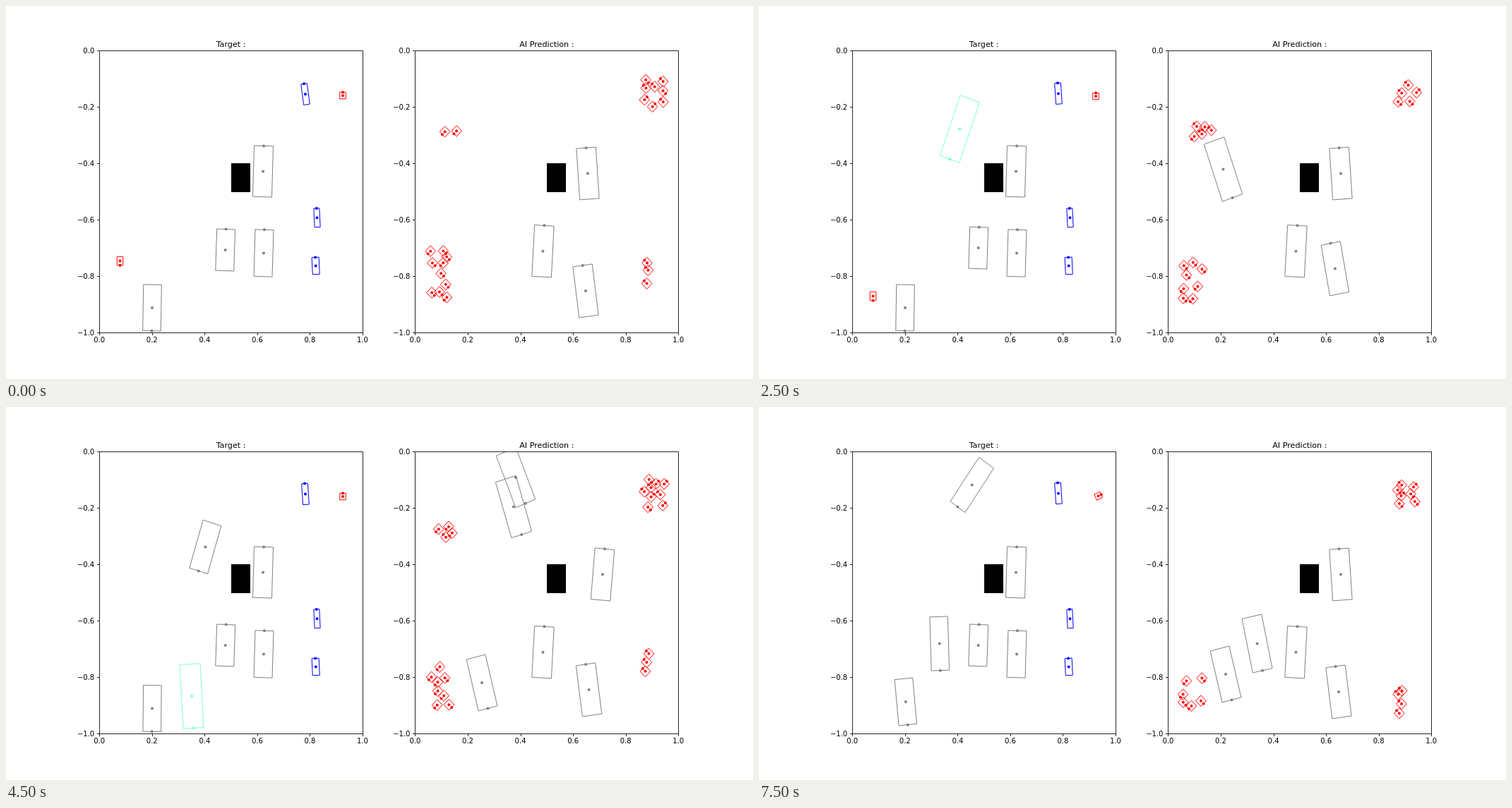
Write an HTML page that moves like this. It is 1058 by 529 pixels and loops after 8000 ms.

```html
<!DOCTYPE html>
<html lang="en">
<head>
<meta charset="utf-8">
<title>Target and prediction</title>
<style>
  html, body { margin: 0; width: 100%; height: 100%; overflow: hidden; background: #fff; }
  svg { display: block; width: 100%; height: 100%; }
  text { font: 10px "DejaVu Sans", sans-serif; }
  .title { font-size: 11.2px; text-anchor: middle; }
  .axes { fill: none; stroke: #000; stroke-opacity: .85; }
</style>
</head>
<body>
<svg viewBox="0 0 1058 529">
  <defs>
    <clipPath id="plots"><path d="M132 63h374v401h-374zM579 63h374v401h-374z"/></clipPath>
  </defs>
  <g id="boxes" clip-path="url(#plots)"></g>
  <g id="frame"></g>
</svg>
<script>
const STEP = 500, STEPS = 16;
const TOP = 63.48, WIDTH = 372.7, HEIGHT = 399.4, ASPECT = HEIGHT / WIDTH;
const LEFT = 132.25, SHIFT = WIDTH * 1.2;
const GREY = '#808080', BLUE = '#00f', RED = '#f00', AQUA = '#7fffd4';

// ---- Axes ----
function plot(left, title) {
  const snap = v => Math.round(v) + .5;
  const x = k => snap(left + WIDTH * k / 5), y = k => snap(TOP + HEIGHT * k / 5);
  let ticks = '', labels = '';
  for (let k = 0; k <= 5; k++) {
    const value = (k / 5).toFixed(1);
    ticks += `M${x(k)} ${y(5)}v3.5M${x(0)} ${y(k)}h-3.5`;
    labels += `<text x="${left + WIDTH * k / 5}" y="477" text-anchor="middle">${value}</text>
      <text x="${left - 7}" y="${TOP + HEIGHT * k / 5 + 3.8}" text-anchor="end">${k ? '−' : ''}${value}</text>`;
  }
  return `<rect x="${Math.round(left + WIDTH / 2)}" y="223" width="27" height="41"/>
    <path class="axes" d="M${x(0)} ${y(0)}H${x(5)}V${y(5)}H${x(0)}Z${ticks}"/>${labels}
    <text class="title" x="${left + WIDTH / 2}" y="57.8">${title}</text>`;
}
document.getElementById('frame').innerHTML = plot(LEFT, 'Target :') + plot(LEFT + SHIFT, 'AI Prediction :');

// Heading in degrees clockwise from up. A box is rectangular in data units,
// so everything vertical is stretched by ASPECT.
function box(color, x, y, heading, halfLength, width) {
  const angle = heading * Math.PI / 180, sin = Math.sin(angle), cos = Math.cos(angle);
  const point = (along, across) => [
    x + sin * along + cos * across,
    y + (sin * across - cos * along) * ASPECT
  ].map(v => v.toFixed(2));
  const dot = ([cx, cy]) => `<circle cx="${cx}" cy="${cy}" r="2" fill="${color}"/>`;
  const half = width / 2;
  const corners = [point(halfLength, -half), point(halfLength, half), point(-halfLength, half), point(-halfLength, -half)];
  return `<polygon points="${corners.join(' ')}" fill="none" stroke="${color}"/>`
    + dot(point(0, 0)) + dot(point(halfLength, 0));
}

const bump = (s, center, spread) => Math.exp(-(((s - center) / spread) ** 2));
const within = (s, ...ranges) => ranges.some(([from, to]) => s >= from && s <= to);

// ---- Moving cars: a smooth path through [step, x, y], heading along it ----
const movers = [
  { color: AQUA, steps: [2, 9], halfLength: 42.4, width: 29, path: [[4, 301.5, 134.3], [6, 272, 222], [9, 263, 410]] },
  { color: GREY, steps: [6, 13], halfLength: 33.2, width: 26.8,
    path: [[6, 345.7, 85.5], [9, 282.3, 198.5], [11, 267, 296], [13, 265.5, 423.7]] },
  { color: GREY, steps: [10, 15], halfLength: 35.6, width: 25.5, path: [[11, 298.7, 125], [13, 264.7, 222.5], [15, 255.7, 335.5]] },
  { color: GREY, steps: [14, 15], halfLength: 35.6, width: 25.5, path: [[14, 326, 73], [15, 301.7, 110.5]] }
];
const activeMovers = s => movers.filter(m => within(s, m.steps));

// Lagrange interpolation.
function position(path, s) {
  return [1, 2].map(i => path.reduce((sum, a) => sum + path.reduce(
    (term, b) => a === b ? term : term * (s - b[0]) / (a[0] - b[0]), a[i]), 0));
}
function mover({ color, path, halfLength, width }, s) {
  const [x, y] = position(path, s), [x2, y2] = position(path, s + .01);
  const heading = Math.atan2(x2 - x, (y - y2) / ASPECT) * 180 / Math.PI;
  return box(color, x, y, heading, halfLength, width);
}

function target(s) {
  const progress = s / (STEPS - 1);
  const nudge = 1 - (1 - Math.min(1, Math.max(0, (s - 4) / 5))) ** 2;
  const turn = Math.max(0, s - 11);
  return [
    box(GREY, 364, 234.5, 1.7, 33.7, 27),
    box(GREY, 365, 350.5, 1.8, 31, 26),
    box(GREY, 310.7, 346 - 8 * nudge, 2, 27.5, 26),
    box(GREY, 207 + .8 * progress ** 5, 428 - 10 * progress ** 6, 181 - 6.5 * progress ** 5, 30.6, 25.6),
    box(BLUE, 424, 125 - .17 * s, -4 - 4 * Math.exp(-s), 13.9, 8.7),
    box(BLUE, 440.5, 300.3, -3, 12.5, 8),
    box(BLUE, 438.7, 368.5, -3, 11.3, 10),
    box(RED, 477 + .9 * turn, 127 + Math.sin(s * Math.PI / 9), 16.5 * turn, 4.4, 8.5),
    s <= 6 ? box(RED, 161.5, 361.5 + 10 * s, 180, 5.8, 8.5) : '',
    ...activeMovers(s).map(m => mover(m, s))
  ].join('');
}

// ---- Prediction ----
function predictedCars(s) {
  const car = (x, y, heading, halfLength = 34, width = 27.6) => box(GREY, x, y, heading, halfLength, width);
  const slip = bump(s, 9, 1.5), lift = bump(s, 6, 1.8), entering = within(s, [8, 10]);
  return [
    within(s, [6, 7]) ? '' : car(824 + 21 * slip, 237.5, -4 + 9 * slip),
    car(760.5, 347.7, 3.2),
    car(821 - 7 * lift + 5 * slip, 404 - 43 * lift - 17 * bump(s, 11, 1), -7.5 - 4 * lift),
    within(s, [3, 4], [8, 12], [14, 15]) ? car(661 + 13 * slip, 379 + 12 * slip, 166, 35) : '',
    within(s, [5, 7]) ? car(657.5, 231.5, 161, 40, 30) : '',
    entering ? car(722, 100, 158, 37, 30) + car(719, 141.5, 163, 38.5, 30) : '',
    // Moving cars are only recognised in the middle of the lane.
    ...activeMovers(s).map(m => position(m.path, s)).filter(([, y]) => y > 200 && y < 350)
      .map(([x, y]) => car(x + SHIFT + 9 * Math.sin(1.2 * s + 3.7), y, y < 270 ? 205 : 168, 36.5, 28.3))
  ].join('');
}

// Crowds gather at four places; their size is known at a few steps.
const CROWD_STEPS = [0, 4, 6, 9, 11, 13, 15];
const crowds = [
  { x: 918, y: () => 124, width: 30, rise: 4.8, headings: [45, -45, 135], sizes: [8, 6, 4, 9, 9, 3, 7] },
  { x: 627, y: () => 177, width: 30, rise: 4, headings: [-45, -135], sizes: [2, 9, 0, 4, 3, 0, 0] },
  { x: 614, y: s => 380 + 1.7 * s, width: 27, rise: 7, headings: [-135, 135], sizes: [10, 10, 6, 8, 0, 5, 6] },
  { x: 908, y: s => 379 - 15 * bump(s, 9, 2) + 41 * bump(s, 15, 2), width: 6, rise: 10, headings: [-45], sizes: [3, 0, 0, 3, 0, 0, 4] }
];

function crowdSize(sizes, s) {
  const next = Math.max(1, CROWD_STEPS.findIndex(step => step >= s));
  const from = CROWD_STEPS[next - 1], to = CROWD_STEPS[next];
  return Math.round(sizes[next - 1] + (sizes[next] - sizes[next - 1]) * (s - from) / (to - from));
}

function seeded(seed) {
  return () => {
    const v = Math.sin(++seed * 12.9898) * 43758.5453;
    return v - Math.floor(v);
  };
}

// Each person takes the candidate spot farthest from the others.
function crowd(place, s, seed) {
  const random = seeded(seed), people = [];
  const size = crowdSize(place.sizes, s);
  const clearance = spot => Math.min(...people.map(p => Math.hypot(p.x - spot.x, p.y - spot.y)));
  while (people.length < size) {
    const spots = Array.from({ length: 10 }, () => ({
      x: place.x + (random() - .5) * place.width,
      y: place.y(s) + (random() - .5) * place.rise * size
    }));
    people.push(spots.reduce((a, b) => clearance(b) > clearance(a) ? b : a));
  }
  return people.map(({ x, y }) => {
    const heading = place.headings[Math.floor(random() * place.headings.length)];
    return box(RED, x, y, heading, 5.2, 10.3);
  }).join('');
}

function prediction(s) {
  return predictedCars(s) + crowds.map((place, i) => crowd(place, s, s * 1000 + i * 250)).join('');
}

const boxes = document.getElementById('boxes');
let shown = -1;
function draw() {
  const step = Math.floor(performance.now() / STEP) % STEPS;
  if (step !== shown) {
    boxes.innerHTML = target(step) + prediction(step);
    shown = step;
  }
  requestAnimationFrame(draw);
}
draw();
</script>
</body>
</html>
```
